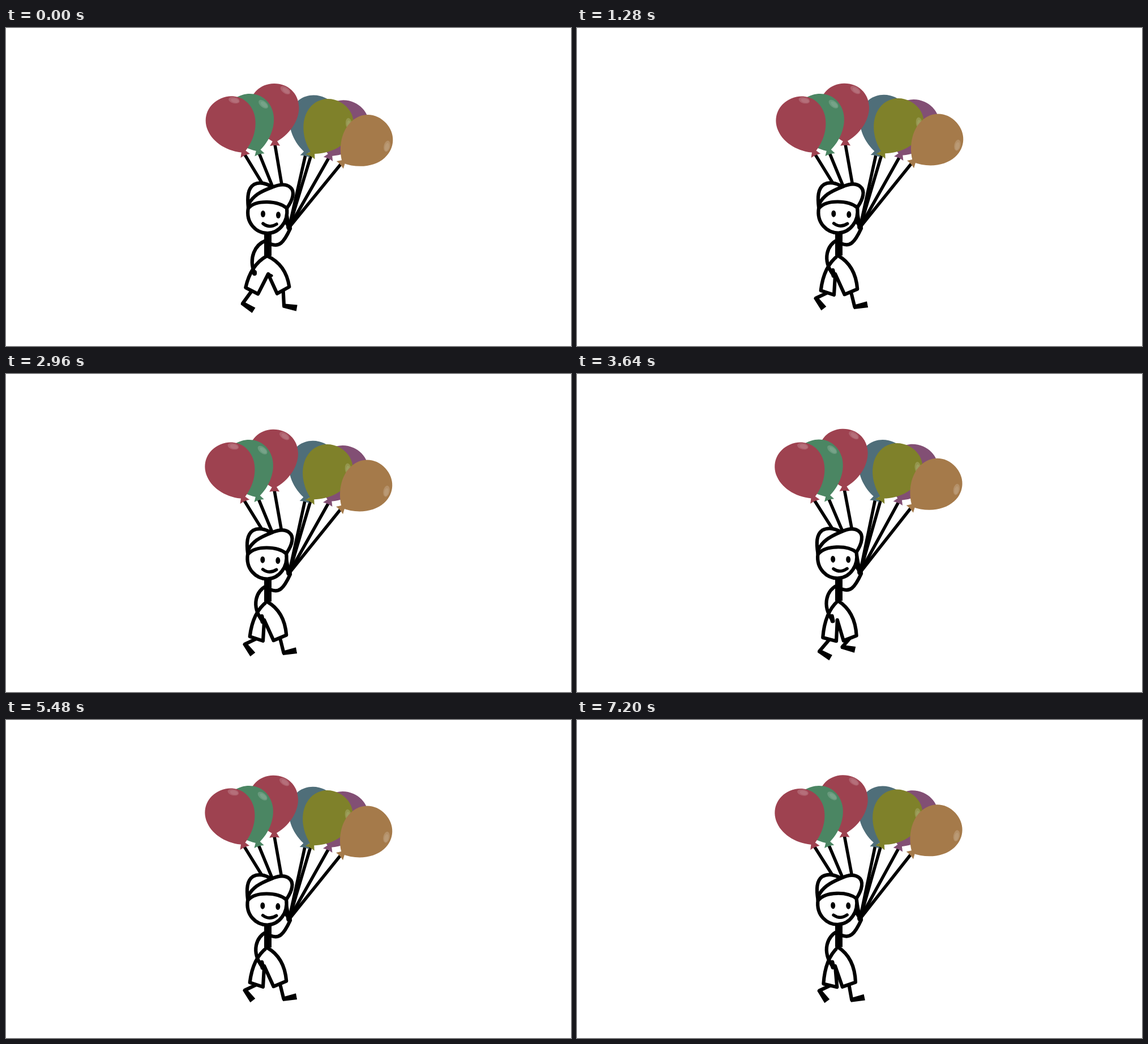
Recreate the animation shown at these times as an HTML page with a canvas. Size 998 by 561 pixels, loop 7240 ms.

```html
<!DOCTYPE html>
<html lang="en">
<head>
<meta charset="utf-8">
<title>Walk with balloons</title>
<style>
  html, body { margin: 0; width: 100%; height: 100%; overflow: hidden; background: #fff; }
  canvas { display: block; }
</style>
</head>
<body>
<canvas id="stage" width="998" height="561"></canvas>
<script>
const ctx = document.getElementById('stage').getContext('2d');
const { PI, sin, cos, sqrt, max } = Math;
const LOOP = 7240, CYCLE = 840, FIRST_STEP = 380, FRAME = 40;
const INK = '#000', PAPER = '#fff', LINE = 6.2;
const HAND = { x: 500, y: 352 }, HIP = { x: 461, y: 411 }, NECK = { x: 462, y: 362 };
const THIGH = 59, CUFF = 12.3, SHIN = 27.5, FOOT = 23;

// Back to front; x and y are the tip, tilt is in degrees
const balloons = [
  { x: 530, y: 220, tilt: 14, color: '#4f6e79', side: true },
  { x: 572, y: 225, tilt: 25, color: '#824f74', side: true },
  { x: 475, y: 201, tilt: -1, color: '#9e4250' },
  { x: 446, y: 217, tilt: -16, color: '#4b8663', side: true },
  { x: 420, y: 219, tilt: -23, color: '#9e4250' },
  { x: 541, y: 221, tilt: 29, color: '#7f812a', side: true },
  { x: 595, y: 237, tilt: 48, color: '#a57a4a', side: true }
];

// Resting angles in degrees: thigh lean, knee bend, extra bend in swing, toe
const farLeg = { lean: 3, bend: 26, flex: 32, toe: 4 };
const nearLeg = { lean: -1, bend: 9, flex: 62, toe: -12 };

const rad = deg => deg * PI / 180;
const ahead = (p, angle, len) => ({ x: p.x + sin(angle) * len, y: p.y + cos(angle) * len });
const at = p => `${p.x} ${p.y} `;

function stroke(path, width = LINE) {
  ctx.lineWidth = width;
  ctx.strokeStyle = INK;
  ctx.stroke(new Path2D(path));
}

function fill(path, color) {
  ctx.fillStyle = color;
  ctx.fill(new Path2D(path));
}

function oval(x, y, rx, ry, turn, color) {
  ctx.fillStyle = color;
  ctx.beginPath();
  ctx.ellipse(x, y, rx, ry, turn, 0, PI * 2);
  ctx.fill();
}

function placed(x, y, angle, draw) {
  ctx.save();
  ctx.translate(x, y);
  ctx.rotate(angle);
  draw();
  ctx.restore();
}

// Rotates about a fixed point, keeping stage coordinates
function swung(p, lift, angle, draw) {
  placed(p.x, p.y + lift, angle, () => {
    ctx.translate(-p.x, -p.y);
    draw();
  });
}

function drawBalloon({ x, y, tilt, color, side }) {
  placed(x, y, rad(tilt), () => {
    fill('M0 1C-25 -11 -43.5 -36 -43.5 -60C-43.5 -86 -24 -103 0 -103' +
      'C24 -103 43.5 -86 43.5 -60C43.5 -36 25 -11 0 1Z', color);
    fill('M-3 -3L3 -3L9 7Q0 5 -9 7Z', color);
    const [hx, hy, turn] = side ? [31, -77, 0.96] : [20, -91, 0.63];
    oval(hx, hy, 10, 5.5, turn, 'rgba(255,255,255,.17)');
    oval(hx + 1, hy + 1, 7, 3.5, turn, 'rgba(255,255,255,.09)');
  });
}

function drawBunch() {
  for (const b of balloons) {
    stroke(`M${at(ahead(b, rad(-b.tilt), 5))}L${at(HAND)}`, 5.6);
  }
  balloons.forEach(drawBalloon);
}

// step: 0 is the front contact, PI the push-off
function poseLeg({ lean, bend, flex, toe }, step) {
  const swing = max(0, -sin(step)), fold = sqrt(swing);
  const thigh = rad(lean + 26 * cos(step) + 6 * swing);
  const knee = ahead(HIP, thigh, THIGH);
  const heel = ahead(knee, thigh - rad(bend + flex * fold), SHIN - 8 * fold);
  const drop = rad(toe + 25 * (1 - cos(step - 0.7)));
  return {
    knee, heel, drop,
    back: ahead(knee, thigh - PI / 2, CUFF),
    front: ahead(knee, thigh + PI / 2, CUFF)
  };
}

function drawLeg(leg, other, waist, crotch) {
  stroke(`M${at(leg.knee)}L${at(leg.heel)}`);
  placed(leg.heel.x, leg.heel.y, leg.drop, () =>
    fill(`M-2 -3.5L${FOOT} -5.5L${FOOT} 5.5L-2 3.5Z`, INK));

  const bulge = (p, out) => `Q${(waist.x + p.x) / 2 + out} ${(waist.y + p.y) / 2 - 12} `;
  const back = leg.back.x <= other.back.x
    ? `M${at(waist)}${bulge(leg.back, -10)}${at(leg.back)}`
    : `M${at(crotch)}L${at(leg.back)}`;
  const front = `L${at(leg.front)}` + (leg.front.x >= other.front.x
    ? bulge(leg.front, 14) + at(waist)
    : `L${at(crotch)}`);
  fill(`${back}${front}L${at(waist)}Z`, PAPER);
  stroke(back + front);
}

function drawHead() {
  const backHat = 'M428 317C426 298 427 283 438 276C448 271 460 274 469 280';
  const frontHat = 'M429 310C437 296 448 289 470 281C482 276 494 274 502 281C511 288 507 303 496 318';
  const brim = 'M429 317C442 303 480 304 496 318';
  const face = 'M428 317C423 344 442 362 462 362C482 362 499 342 496 318';
  fill(backHat + 'L496 318Z', PAPER);
  fill(frontHat + 'Z', PAPER);
  fill(face + 'C480 304 442 303 428 317Z', PAPER);
  [backHat, frontHat, brim, face].forEach(p => stroke(p));
  oval(454, 328, 4, 6, 0, INK);
  oval(481, 330, 4, 6, 0, INK);
  stroke('M454 345Q465 354 478 346', 5.5);
}

function drawTorso() {
  stroke('M467 381C482 387 490 380 502 354');
  oval(500, 351, 5, 6, 0, INK);
  ctx.fillStyle = INK;
  ctx.fillRect(456, 360, 13, 42);
}

function drawSwingArm(u, lift) {
  const x = 439 + 15 * u, y = 433 + 4 * u + lift / 2;
  stroke(`M459 ${375 + lift}C${440 + 4 * u} ${382 + lift} ` +
    `${428 + 3 * u} ${405 + 3 * u + lift} ${x} ${y}`);
  stroke(`M${x - 2 * u} ${y - 2 - 7 * u}L${x} ${y}`, 8);
}

function draw(t) {
  // The first step is a little quicker than the second
  const walk = t < FIRST_STEP
    ? PI * t / FIRST_STEP
    : PI + PI * (t - FIRST_STEP) / (CYCLE - FIRST_STEP);
  const rise = (1 - cos(2 * walk)) / 2;
  const sway = -(7.5 - 1.5 * sin(walk)) * rise;
  const lift = -3.3 * rise;
  const waist = { x: 461, y: 402 + lift };
  const crotch = { x: 460 + 4 * cos(walk - 0.7), y: 434 };
  const far = poseLeg(farLeg, walk), near = poseLeg(nearLeg, walk + PI);

  ctx.fillStyle = PAPER;
  ctx.fillRect(0, 0, 998, 561);
  ctx.lineCap = ctx.lineJoin = 'round';

  swung(HAND, lift, sway / 190, drawBunch);
  drawLeg(far, near, waist, crotch);
  drawLeg(near, far, waist, crotch);
  if (cos(walk) > 0) stroke(`M${at(crotch)}l6 3`, 5);
  swung(NECK, lift, 0, drawTorso);
  swung(NECK, lift, sway * 0.016, drawHead);
  drawSwingArm((1 - cos(walk)) / 2, lift);
}

const start = performance.now();
function tick() {
  const t = (performance.now() - start) % LOOP;
  draw(Math.floor(t / FRAME) * FRAME % CYCLE);
  requestAnimationFrame(tick);
}
tick();
</script>
</body>
</html>
```
